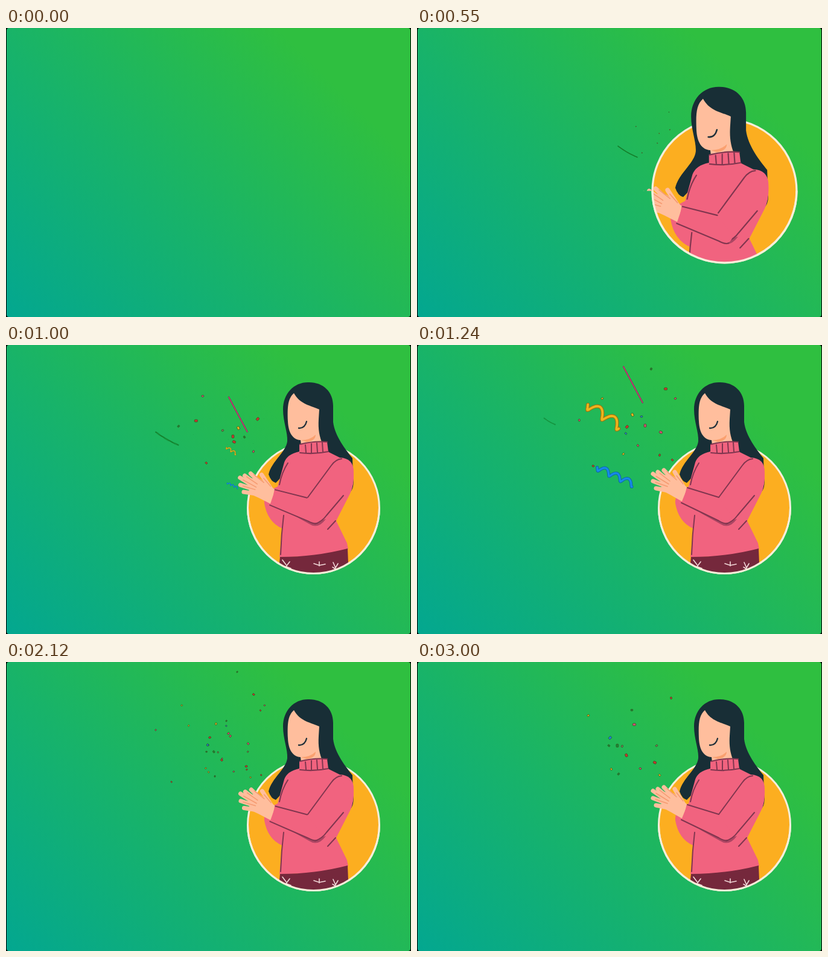
An HTML page that plays this animation: 671 by 480 pixels, repeating every 3.03 s.

```html
<!DOCTYPE html>
<html lang="en">
<head>
<meta charset="utf-8">
<title>Applause</title>
<style>
html, body { margin: 0; width: 100%; height: 100%; overflow: hidden; background: #000; }
svg { display: block; width: 671px; height: 480px; }
.soft { filter: blur(.45px); }
.skin { fill: #ffbe9d; }
.wool { fill: #f1637f; }
.line { fill: none; stroke: #80364f; stroke-width: 2; stroke-linecap: round; stroke-linejoin: round; }
.fingers { fill: none; stroke: #ffbe9d; stroke-width: 7; stroke-linecap: round; }
.crease { fill: none; stroke: #f59a70; stroke-width: 1.5; stroke-linecap: round; }
.ring { fill: none; stroke: #f5efda; stroke-width: 3; }
.rays { fill: none; stroke: #c5efc8; stroke-width: 2.2; stroke-linecap: round; }
.flower { fill: none; stroke: #f3d9da; stroke-width: 1.6; stroke-linecap: round; }
</style>
</head>
<body>
<svg viewBox="0 0 671 480">
  <defs>
    <linearGradient id="sky" gradientUnits="userSpaceOnUse" x1="0" y1="480" x2="465" y2="15">
      <stop stop-color="#03a790"/><stop offset=".5" stop-color="#18b369"/><stop offset="1" stop-color="#2fbf40"/>
    </linearGradient>
    <clipPath id="window">
      <path d="M-200-300H1000V270.5H619.5A110 110 0 0 1 399.5 270.5H-200Z"/>
    </clipPath>
  </defs>
  <rect x="1" width="669" height="480" rx="4" fill="url(#sky)"/>
  <g id="confetti" class="soft"></g>
  <g id="badge" class="soft">
    <circle cx="509.5" cy="270.5" r="109" fill="#fcae20"/>
    <circle class="ring" cx="509.5" cy="270.5" r="109"/>
    <g clip-path="url(#window)">
      <g id="woman">
        <path fill="#182e36" d="M502 62C478 61 459 80 459 107C459 128 467 145 466 160C464 178 440 193 435 215Q439 227 447 229L480 195L560 195L568 246Q578 240 575 218L574 188C563 174 545 152 542 128V101C542 78 526 62 502 62Z"/>
        <path class="skin" d="M477 80C467 89 466 102 467 127C468 146 475 157 488 158L489 166H525C519 152 517 140 518 123L519 107C507 101 487 99 477 80Z"/>
        <path fill="#faa06f" d="M489 158Q504 158 513 149Q513 159 498 161Z"/>
        <path d="M485 138Q495 139 498 127" fill="none" stroke="#20303a" stroke-width="2.3" stroke-linecap="round"/>
        <path class="wool" d="M450 235Q426 246 428 263Q433 294 458 305L466 260Z"/>
        <path class="wool" d="M486 177Q466 181 461 195L450 235L460 285L453 352Q510 354 567 339L565 329L547 292L570 247Q577 233 576 211Q576 188 553 187L533 177Z"/>
        <path fill="#75283c" d="M454 352Q512 352 566 338L569 410H448Z"/>
        <path class="flower" d="M458 357L464 365M470 360L464 368L472 371M510 363L519 366L529 364M519 360V367M542 361L546 370L550 363M541 369L546 372"/>
        <path class="wool" d="M486 165Q510 159 532 161L534 177Q510 182 486 180Z"/>
        <path class="line" d="M487 165Q510 159 532 161M487 179Q510 182 534 177M496 166L497 178M506 164V179M515 163L516 178M524 162L525 177M467 196Q457 211 453 232M460 283Q456 315 455 348M546 292L533 306"/>
        <path d="M468 278L502 297Q517 307 530 289L514 293Z" fill="#ad4663"/>
        <path class="wool" d="M556 189Q546 190 539 200L500 253L512 297L531 287L572 239Z"/>
        <path class="line" d="M556 189Q546 190 539 200L500 253M512 297Q524 293 531 283L559 250"/>
        <g id="arm">
          <path class="fingers" d="M441 235L427 211M432 232L409 208M427 234L399 211M422 236L391 214M422 238L391 226M422 243L396 238"/>
          <path class="skin" d="M405 215L425 218L447 236L441 261L420 249L405 241Z"/>
          <path class="crease" d="M419 226L402 213M417 231L396 218M415 235L395 228M430 224L414 210M441 231L430 217"/>
          <path class="wool" d="M448 237L500 253L522 285Q518 299 505 295L438 262Z"/>
          <path class="line" d="M500 253L448 237M438 262L500 292Q510 298 515 296"/>
        </g>
      </g>
    </g>
    <path class="ring" d="M400.5 270.5A109 109 0 0 0 618.5 270.5"/>
  </g>
  <path id="rays" class="rays soft" d="M384 182L395 204M408 183V205M374 199L389 207M369 219L388 215M388 243L394 233"/>
</svg>
<script>
const LOOP = 3030, BEAT = 760;
const CX = 509.5, CY = 270.5;
const COLORS = { r: '#c5362f', y: '#e4b521', g: '#188a35', b: '#1685d2', p: '#d44b76', k: '#72805b' };

// Each dot is [x, y, colour] at the middle of its burst.
const BURSTS = [
  { at: [760], dots: [[344, 148, 'r'], [357, 205, 'r'], [394, 163, 'y'], [417, 155, 'r'], [390, 184, 'r'],
    [415, 117, 'g'], [404, 208, 'y']] },
  { at: [1000, 1760, 2520], dots: [[315, 126, 'r'], [385, 138, 'y'], [417, 123, 'r'], [378, 161, 'r'], [376, 152, 'r'],
    [359, 142, 'k'], [332, 196, 'r'], [410, 177, 'p'], [326, 85, 'p'], [395, 153, 'g'], [286, 135, 'g']] },
  { at: [1240, 2000, 2760], dots: [[412, 73, 'r'], [357, 116, 'y'], [348, 136, 'r'], [404, 145, 'p'], [378, 134, 'p'],
    [428, 89, 'p'], [423, 191, 'r'], [388, 40, 'g'], [372, 119, 'b'], [366, 167, 'p'], [342, 181, 'y'],
    [292, 201, 'r'], [269, 125, 'p'], [307, 89, 'y'], [346, 147, 'b'], [402, 183, 'r']] },
  { at: [1480, 2240, 3000], dots: [[360, 104, 'p'], [347, 155, 'r'], [320, 126, 'b'], [394, 167, 'r'], [332, 139, 'g'],
    [284, 89, 'y'], [402, 188, 'y'], [340, 140, 'k'], [356, 80, 'g'], [322, 178, 'y'], [334, 186, 'g'],
    [370, 177, 'p'], [421, 60, 'r'], [397, 139, 'k'], [318, 139, 'g']] }
];

// Keys are [time, x, y, scale].
const STREAMERS = [
  { color: '#168a2c', shade: '#126a25', length: 66, waves: .5, amp: 2, angle: 30, width: 2.6,
    keys: [[330, 386, 228, 0], [360, 381, 225, .18], [760, 314, 184, 1], [1240, 220, 127, .34], [1320, 205, 118, 0]] },
  { color: '#d92f78', shade: '#702f51', length: 68, waves: 0, amp: 0, angle: 62, width: 2.2,
    keys: [[560, 433, 205, 0], [760, 411, 165, .92], [1240, 358, 66, 1], [1480, 332, 28, 0]] },
  { color: '#efb51c', shade: '#9c7311', length: 70, waves: 2.4, amp: 8, angle: 34, width: 6,
    keys: [[900, 400, 200, 0], [1240, 310, 117, 1], [1620, 220, 58, 0]] },
  { color: '#168be8', shade: '#0d63ac', length: 68, waves: 3.3, amp: 5, angle: 25, width: 5,
    keys: [[900, 395, 240, 0], [1240, 328, 217, 1], [1760, 225, 185, .42], [1860, 207, 179, 0]] },
  { color: '#e33a36', shade: '#8a2526', length: 42, waves: 3.4, amp: 6, angle: 85, width: 4,
    keys: [[1510, 417, 155, 0], [1760, 411, 83, 1], [2080, 404, 28, 0]] }
];

const el = id => document.getElementById(id);
const clamp = x => Math.max(0, Math.min(1, x));
const mix = (a, b, u) => a + (b - a) * u;
const span = (t, from, to) => clamp((t - from) / (to - from));

function radius(t) {
  if (t < 520) return 121 * Math.sin(span(t, 30, 520) ** 1.2 * Math.PI / 2);
  return mix(121, 110, (1 - Math.cos(Math.PI * span(t, 520, 760))) / 2);
}

function keyed(keys, t) {
  const i = keys.findIndex(k => k[0] > t);
  if (i < 1) return null;
  const a = keys[i - 1], b = keys[i], u = span(t, a[0], b[0]);
  return a.map((v, j) => mix(v, b[j], u));
}

function wave({ length, waves, amp }) {
  const steps = 48;
  let d = '';
  for (let i = 0; i <= steps; i++) {
    const u = i / steps, phase = u * waves * 2 * Math.PI;
    const x = (u - .5) * length + Math.cos(phase) * amp * .35;
    d += `${i ? 'L' : 'M'}${x.toFixed(1)} ${(Math.sin(phase) * amp).toFixed(1)}`;
  }
  return d;
}
STREAMERS.forEach(s => s.path = wave(s));

function streamer(s, t) {
  const key = keyed(s.keys, t);
  if (!key) return '';
  const [, x, y, scale] = key;
  const stroke = (color, width) => `<path d="${s.path}" fill="none" stroke="${color}" stroke-width="${width}" stroke-linecap="round"/>`;
  return `<g transform="translate(${x} ${y}) rotate(${s.angle}) scale(${scale})">`
    + stroke(s.shade, s.width) + stroke(s.color, s.width * .62) + '</g>';
}

function burst({ at, dots }, t) {
  const life = 240, start = at.find(m => Math.abs(t - m) < life);
  if (start === undefined) return '';
  const dt = t - start, reach = 1 + dt / 900, fade = Math.cos(dt / life * Math.PI / 2);
  return dots.map(([x, y, c], i) => {
    const px = mix(425, x, reach), py = mix(215, y, reach);
    const w = (i < 5 ? 5.2 : 3.6) * fade, h = w * .75;
    return `<rect x="${-w / 2}" y="${-h / 2}" width="${w}" height="${h}" rx="${h / 3}" fill="${COLORS[c]}"
      stroke="#3d4a1c" stroke-width=".7" transform="translate(${px} ${py}) rotate(${i * 67 + dt / 4})"/>`;
  }).join('');
}

function draw(t) {
  const r = radius(t);
  el('badge').setAttribute('transform', `translate(${CX} ${CY}) scale(${r / 110}) translate(${-CX} ${-CY})`);
  el('badge').style.display = r > 0 ? '' : 'none';

  const rise = 336 * (1 - span(t, 160, 800)) ** 2;
  el('woman').setAttribute('transform', `translate(0 ${rise})`);

  const clap = (t - 700 + 587) % 587;
  const swing = t > 900 ? Math.sin(Math.PI * span(clap, 180, 430)) : 0;
  const settle = 1 - span(t, 760, 900);
  el('arm').setAttribute('transform', `translate(0 ${settle * 3}) rotate(${-3 * settle - 3 * swing} 512 280)`);

  const flash = t > 690 && clap < 130;
  const spread = mix(.75, 1.2, clap / 130);
  el('rays').style.opacity = flash ? Math.min(1, (130 - clap) / 50) : 0;
  el('rays').setAttribute('transform', `translate(402 220) scale(${spread}) translate(-402 -220)`);

  el('confetti').innerHTML = STREAMERS.map(s => streamer(s, t)).join('') + BURSTS.map(b => burst(b, t)).join('');
}

const begin = performance.now();
function tick() {
  draw((performance.now() - begin) % LOOP);
  requestAnimationFrame(tick);
}
tick();
</script>
</body>
</html>
```
